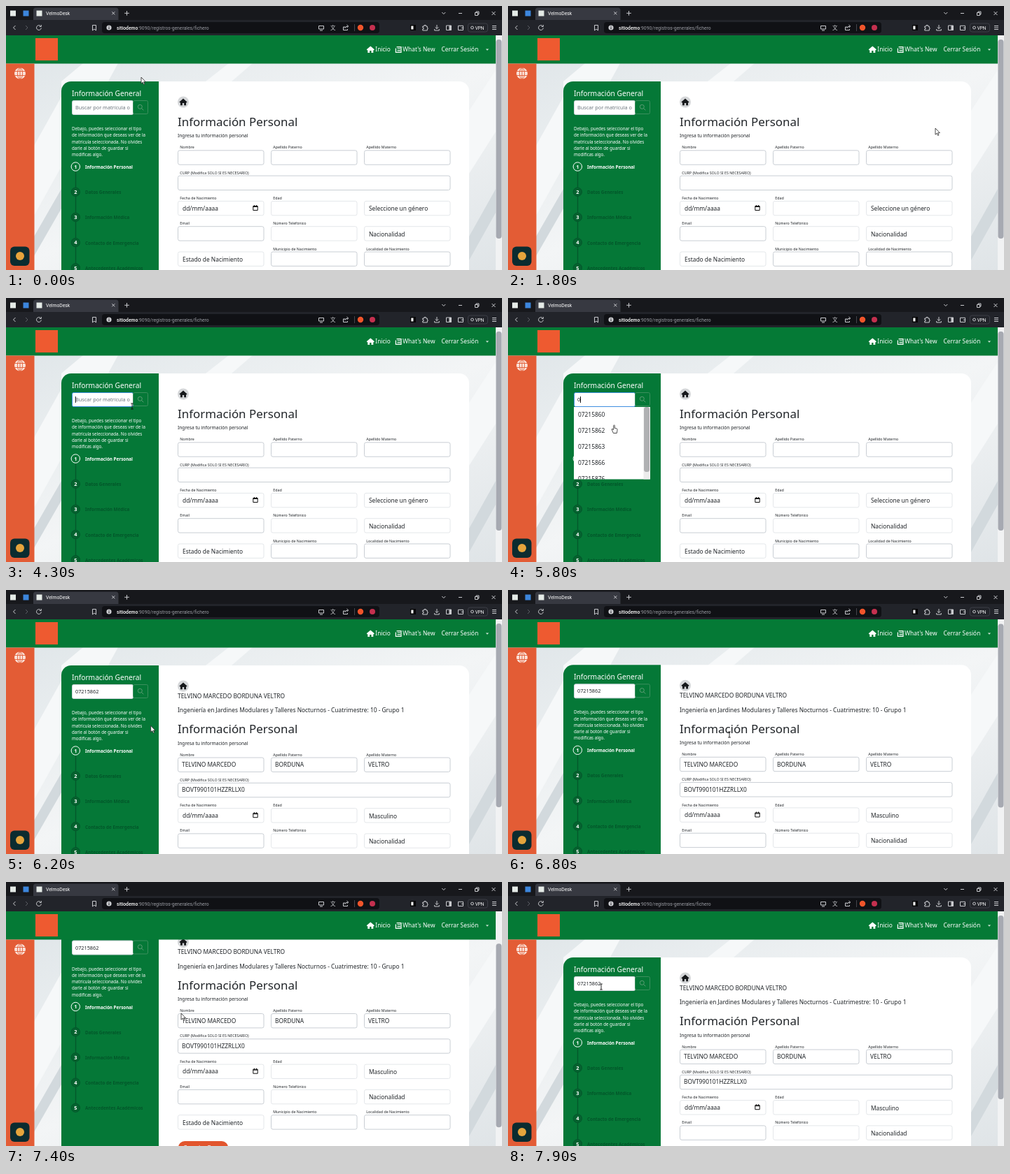
Recreate the animation shown at these times as an HTML page. Size 708 by 378 pixels, loop 8 s.

```html
<!DOCTYPE html>
<html lang="es">
<head>
<meta charset="utf-8">
<title>Registro</title>
<style>
html, body { margin: 0; width: 100%; height: 100%; overflow: hidden; background: #17181c; }
svg { display: block; width: 708px; height: 378px; font-family: "Noto Sans", sans-serif; }
text { white-space: pre; }
.ui { font-family: Roboto, sans-serif; font-size: 6.8px; fill: #fff; }
.line { fill: none; stroke: #c9cace; stroke-width: 1; }
.body { font-size: 8.4px; fill: #212529; }
.label { font-size: 5.3px; fill: #212529; }
.intro { font-size: 6.2px; font-weight: 500; fill: #fff; }
.step { font-size: 6.3px; font-weight: 600; fill: #03562a; }
.nav { font-size: 8.4px; font-weight: 500; fill: #fff; }
</style>
</head>
<body>
<svg viewBox="0 0 708 378">
  <defs>
    <linearGradient id="paper" x2="1" y2="1">
      <stop offset="0" stop-color="#e0e6e9"/><stop offset=".5" stop-color="#f3f5f6"/><stop offset="1" stop-color="#dfe4e7"/>
    </linearGradient>
    <clipPath id="listClip"><rect x="94" y="156" width="109" height="103.5"/></clipPath>
    <path id="house" d="M0-5.2L5.6-.3L4.6.8L4 .3V4.5H1.2V1.3H-1.2V4.5H-4V.3L-4.6.8L-5.6-.3Z"/>
  </defs>

  <rect y="82" width="708" height="296" fill="url(#paper)"/>
  <path d="M40 200L79 130V108L110 82H160L79 230L40 300Z M285 108L318 82H352L322 108Z M661 150L699 92V180L661 240Z" fill="#f6f8f9"/>
  <path d="M40 330L79 262V290L40 358Z M661 330L699 262V296L661 364Z" fill="#d2d9dd"/>

  <g id="page">
    <rect x="79" y="108" width="582" height="380" rx="14" fill="#fff"/>
    <path d="M218 108H93A14 14 0 0 0 79 122V488H218Z" fill="#057837"/>
    <text x="94" y="128.6" font-size="10.2" fill="#fff">Información General</text>
    <rect id="search" x="94.5" y="135.5" width="87" height="20" rx="2" fill="#fff" stroke="#ced4da"/>
    <text id="query" x="99" y="148" font-size="7.3"/>
    <path id="caret" d="M0 141V150" stroke="#111" stroke-width="1"/>
    <rect x="181.5" y="135.5" width="21" height="19" rx="2" fill="none" stroke="#3c8f5e"/>
    <g fill="none" stroke="#5d9d75"><circle cx="191.3" cy="144.3" r="3"/><path d="M193.5 146.5L196.3 149.3"/></g>
    <g id="intro"></g>
    <path d="M99.5 237V375" stroke="#04582c" stroke-width="1.4"/>
    <g id="steps"></g>

    <circle cx="253" cy="137.5" r="8" fill="#d5d7d9"/>
    <use href="#house" x="253" y="137.8" fill="#16181b"/>
    <g id="student" class="body">
      <text x="245" y="154.6">TELVINO MARCEDO BORDUNA VELTRO</text>
      <text x="245" y="175.3">Ingeniería en Jardines Modulares y Talleres Nocturnos - Cuatrimestre: 10 - Grupo 1</text>
    </g>
    <g id="form">
      <text x="245" y="172" font-size="16.9" font-weight="300" fill="#212529">Información Personal</text>
      <text x="245" y="188.4" font-size="6.65" fill="#212529">Ingresa tu información personal</text>
      <g id="fields"></g>
      <path d="M352.8 286.5h6.4v6h-6.4zM352.8 287.5h6.4M354.4 285v2M357.6 285v2" fill="none" stroke="#111"/>
      <rect x="246" y="389.3" width="71" height="20" rx="9" fill="#e2552d"/>
      <text x="281.5" y="402" class="nav" text-anchor="middle">Guardar Datos</text>
    </g>
    <g id="list" class="body" clip-path="url(#listClip)">
      <rect x="94" y="156" width="109" height="104" fill="#fff"/>
      <rect x="193.5" y="156" width="9" height="104" fill="#ececec"/>
      <rect x="194" y="156" width="8" height="93" rx="3.5" fill="#b0b1b3"/>
    </g>
  </g>

  <rect y="42" width="699" height="40.5" fill="#057a36"/>
  <rect x="42" y="46" width="32" height="32" fill="#ee5a30"/>
  <use href="#house" x="520.3" y="62.6" fill="#fff"/>
  <g fill="none" stroke="#fff" stroke-width="1.2"><path d="M557.6 58.6H564V66.4H556.4V60.5M558.5 61H563M558.5 63.8H563"/></g>
  <text x="527.3" y="65.4" class="nav">Inicio</text>
  <text x="566.3" y="65.4" class="nav">What's New</text>
  <text x="621.5" y="65.4" class="nav">Cerrar Sesión</text>
  <path d="M684.8 61.5H689.2L687 63.8Z" fill="#d5e8dc"/>

  <rect y="82.5" width="40.5" height="295.5" fill="#e35c35"/>
  <g fill="#fbe3da"><circle cx="20" cy="96.5" r="8"/></g>
  <g fill="none" stroke="#e35c35" stroke-width=".9"><ellipse cx="20" cy="96.5" rx="3.6" ry="8"/><path d="M12 93.5H28M12 99.5H28M20 88.5V104.5"/></g>
  <rect x="6" y="344.5" width="27.5" height="27.5" rx="6" fill="#0b2c30"/>
  <circle cx="20" cy="358" r="6" fill="#e5a43c"/>

  <rect x="699" y="42" width="9" height="336" fill="#f1f2f3"/>
  <rect id="thumb" x="699.5" width="8" rx="3.8" fill="#a6a9b1"/>

  <rect width="708" height="42" fill="#17181c"/>
  <rect y="20" width="708" height="22" fill="#22242a"/>
  <path d="M39 20V6Q39 2.5 42.5 2.5H157Q160.5 2.5 160.5 6V20Z" fill="#373941"/>
  <rect x="6" y="6.5" width="8" height="8" fill="#e4eae6"/>
  <rect x="24.5" y="6.5" width="8" height="8" fill="#3c86dc"/>
  <rect x="43.5" y="6.5" width="8" height="8" fill="#e4eae6"/>
  <text x="57" y="13" class="ui">VelmoDesk</text>
  <path class="line" d="M151.3 8.3L155.3 12.3M155.3 8.3L151.3 12.3M169.2 10.3H175.8M172.5 7V13.6M622.3 9L624.8 11.5L627.3 9M646 10.5H651M669.5 9.5H673.5V13.5H669.5ZM671 9.5V8H675V12H673.5M693.5 8L698.5 13M698.5 8L693.5 13"/>
  <rect x="137" y="23" width="396" height="16" rx="4" fill="#101115"/>
  <path class="line" d="M13.5 28L10.5 31L13.5 34M49.3 28.6A3.4 3.4 0 1 0 50.3 31.5M50.3 27V29.5H47.8M123.5 27.5H128.5V35L126 33L123.5 35Z"/>
  <path class="line" d="M28 28L31 31L28 34" style="stroke:#5b5d64"/>
  <circle cx="147" cy="31" r="3.6" fill="#c9cace"/><path d="M147 30.5V33M147 28.7V29.6" stroke="#101115"/>
  <text x="158" y="33.5" class="ui" style="fill:#999ba2"><tspan font-weight="500" fill="#fff">sitiodemo</tspan>:9090/registros-generales/fichero</text>
  <path class="line" d="M446.5 28.5H453.5V33H446.5ZM448 35H452M484 30H481.5V34.5H487.5V33M483.5 32Q484 29 488.5 29M486.5 27L488.7 29L486.5 31"/>
  <text x="463" y="34" font-size="7.5" fill="#c9cace" font-family="Noto Sans CJK SC, Noto Sans CJK JP, sans-serif">文</text>
  <path d="M497.5 26V36" stroke="#44464d"/>
  <circle cx="506" cy="31" r="4.2" fill="#f0552b"/><circle cx="523" cy="31" r="4" fill="#c4304f"/>
  <rect x="577" y="27" width="8" height="8" fill="#050506"/><rect x="578.3" y="28.5" width="3.2" height="5" fill="#eee"/>
  <path class="line" d="M594.8 29H597V27.5H599.3V29H601.3V31.2H602V33H601.3V35H594.8V33H596V31H594.8ZM615 27V32.5M612.7 30.3L615 32.6L617.3 30.3M611.7 33V35H618.3V33M628.5 28H635.5V34.5H628.5ZM645.5 28.3H652.5V34.5H645.5ZM650 31.4H653.3M694 28.5H700M694 31H700M694 33.5H700"/>
  <rect x="632.5" y="28" width="3" height="6.5" fill="#c9cace"/>
  <rect x="659.5" y="25" width="28" height="12" rx="3" fill="none" stroke="#3d3f47"/>
  <circle cx="665.5" cy="31" r="1.9" class="line"/>
  <text x="669.7" y="33.5" class="ui" style="font-size:6.4px">VPN</text>

  <g id="pointer">
    <path id="arrow" d="M0 0V9.2L2.1 7.2L3.6 10.4L5 9.8L3.6 6.7H6.4Z" fill="#fff" stroke="#222" stroke-width=".8"/>
    <path id="beam" d="M-1.8-4H1.8M0-4V4M-1.8 4H1.8" stroke="#111" stroke-width=".9"/>
    <path id="hand" d="M-1.3-5.5Q-.5-6.6.3-5.5V-1.6L3.2-1Q4.3-.6 4.1.7L3.3 5.5H-1.6L-4-.1Q-3.4-1.4-1.3.6Z" fill="#fff" stroke="#222" stroke-width=".8"/>
  </g>
</svg>
<script>
const $ = id => document.getElementById(id);
const add = (id, markup) => $(id).insertAdjacentHTML('beforeend', markup);
const LOOP = 8000, CODE = '07215862', LOADED = 6100, ROW = 36.3;

['Debajo, puedes seleccionar el tipo', 'de información que deseas ver de la',
 'matrícula seleccionada. No olvides', 'darle al botón de guardar si', 'modificas algo.']
  .forEach((line, i) => add('intro', `<text class="intro" x="94" y="${178 + i * 9.3}">${line}</text>`));

['Información Personal', 'Datos Generales', 'Información Médica', 'Contacto de Emergencia', 'Antecedentes Académicos']
  .forEach((name, i) => {
    const y = 230 + i * 36.2, active = i === 0;
    add('steps', `<circle cx="99.3" cy="${y}" r="6.2" fill="${active ? '#057837' : '#04622f'}" stroke="${active ? '#fff' : '#04582c'}"/>
      <text x="99.3" y="${y + 2.7}" font-size="7.4" font-weight="600" fill="#fff" text-anchor="middle">${i + 1}</text>
      <text class="step" x="113" y="${y + 3}" ${active ? 'style="fill:#fff"' : ''}>${name}</text>`);
  });

// column, row, label, empty text, loaded text, faint border
const fields = [
  [0, 0, 'Nombre', '', 'TELVINO MARCEDO'], [1, 0, 'Apellido Paterno', '', 'BORDUNA'], [2, 0, 'Apellido Materno', '', 'VELTRO'],
  [0, 1, 'CURP (Modifica SOLO SI ES NECESARIO)', '', 'BOVT990101HZZRLLX0'],
  [0, 2, 'Fecha de Nacimiento', 'dd/mm/aaaa', 'dd/mm/aaaa', 1], [1, 2, 'Edad', '', '', 1], [2, 2, '', 'Seleccione un género', 'Masculino', 1],
  [0, 3, 'Email', '', ''], [1, 3, 'Número Telefónico', '', '', 1], [2, 3, '', 'Nacionalidad', 'Nacionalidad', 1],
  [0, 4, '', 'Estado de Nacimiento', 'Estado de Nacimiento', 1], [1, 4, 'Municipio de Nacimiento', '', ''], [2, 4, 'Localidad de Nacimiento', '', '']
];
const values = fields.map(([col, row, label, empty, , faint]) => {
  const x = 245 + col * 133, y = 206.8 + row * ROW, width = row === 1 ? 388.5 : 122.5;
  add('fields', `<text class="label" x="${x + 3.3}" y="${y - 2.4}">${label}</text>
    <rect x="${x + .5}" y="${y}" width="${width}" height="20.4" rx="2.5" fill="#fff" stroke="${faint ? '#e4e7ea' : '#c9ced4'}"/>
    <text class="body" x="${x + (faint ? 7 : 6)}" y="${y + (label ? 13.2 : 14)}">${empty}</text>`);
  return $('fields').lastElementChild;
});

['07215860', CODE, '07215863', '07215866', '07215876']
  .forEach((code, i) => add('list', `<text x="100" y="${170.3 + i * 22.8}">${code}</text>`));

const path = [
  [0, 193, 102], [100, 193, 102], [200, 255, 122], [300, 328, 150], [400, 328, 150], [500, 345, 158], [600, 366, 168], [700, 380, 175],
  [1100, 380, 175], [1400, 450, 192], [1600, 550, 186], [1800, 610, 175], [2000, 629, 173],
  [2300, 540, 178], [2600, 330, 160], [2900, 191, 130], [3100, 176, 146], [3400, 180, 155],
  [5300, 180, 155], [5600, 152, 184], [5800, 152, 188], [6000, 152, 188], [6600, 316, 207],
  [6900, 316, 207], [7400, 250, 188], [7500, 243, 186], [7900, 133, 150]
];
const scrolls = [[0, 0], [6700, 0], [6800, .7], [6900, 32], [7000, 51.5], [7500, 51.5], [7600, 40], [7700, 12], [7800, 0]];
const shapes = [[0, 'arrow'], [3000, 'beam'], [5500, 'hand'], [6000, 'arrow'], [6500, 'beam'], [7100, 'arrow'], [7800, 'beam']];
const blinks = [[0, 0], [3200, 1], [3700, 0], [4300, 1], [5100, 0], [5600, 1], [5900, 0]];

const held = (table, t) => table.filter(row => row[0] <= t).pop()[1];
function tween(table, t) {
  const i = table.findIndex(row => row[0] > t);
  if (i < 0) return table[table.length - 1].slice(1);
  const a = table[i - 1], b = table[i], k = (t - a[0]) / (b[0] - a[0]);
  return a.slice(1).map((v, n) => v + (b[n + 1] - v) * k);
}
const show = (id, on) => $(id).setAttribute('visibility', on ? 'visible' : 'hidden');
const move = (id, x, y) => $(id).setAttribute('transform', `translate(${x} ${y})`);

function draw(t) {
  const loaded = t >= LOADED, chosen = t >= 5900, typed = t >= 4500;
  const focused = t >= 3200 && !chosen;
  const [scroll] = tween(scrolls, t), [x, y] = tween(path, t);

  move('page', 0, -scroll);
  move('form', 0, loaded ? 33.2 : 0);
  show('student', loaded);
  show('list', typed && !chosen);
  values.forEach((node, i) => node.textContent = fields[i][loaded ? 4 : 3]);

  $('query').textContent = chosen ? CODE : typed ? '0' : 'Buscar por matrícula o';
  $('query').setAttribute('fill', typed ? '#212529' : '#6c757d');
  $('search').setAttribute('stroke', focused ? '#3f8fe0' : '#ced4da');
  show('caret', held(blinks, t));
  move('caret', typed ? 103.5 : 99.3, 0);

  const size = loaded ? 263 : 285, range = loaded ? 78 : 46;
  $('thumb').setAttribute('height', size);
  $('thumb').setAttribute('y', 48 + scroll * (324 - size) / range);

  move('pointer', x, y);
  const shape = held(shapes, t);
  ['arrow', 'beam', 'hand'].forEach(id => show(id, id === shape));
}

function frame(now) {
  draw(Math.floor(now % LOOP / 100) * 100);
  requestAnimationFrame(frame);
}
draw(0);
requestAnimationFrame(frame);
</script>
</body>
</html>
```
